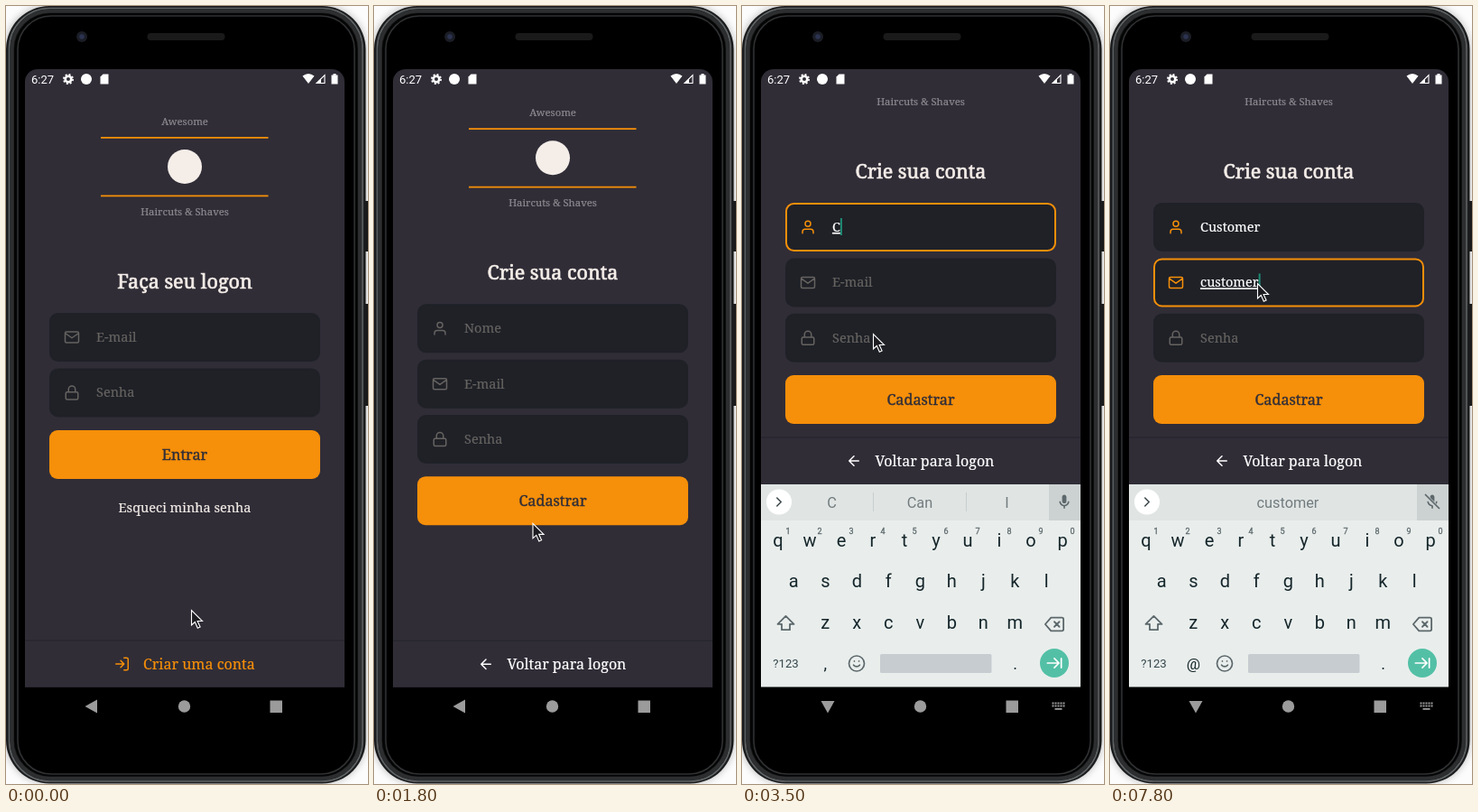
Write an HTML page that moves like this. It is 401 px wide and 862 px high and loops after 8 s.

```html
<!DOCTYPE html>
<html lang="pt-BR">
<head>
<meta charset="utf-8">
<title>Cadastro</title>
<style>
  html, body { margin: 0; width: 100%; height: 100%; overflow: hidden; background: #fcfcfc; }
  svg { display: block; width: 401px; height: 862px; }
  .serif { font-family: "Noto Serif", serif; }
  .sans { font-family: Roboto, sans-serif; }
</style>
</head>
<body>
<svg viewBox="0 0 401 862">
  <defs>
    <clipPath id="screen"><path d="M21 754.5V84a14 14 0 0 1 14-14H361a14 14 0 0 1 14 14V754.5z"/></clipPath>
    <clipPath id="page"><rect x="21" y="92" width="354" height="663"/></clipPath>
    <clipPath id="keys"><path d="M21 530H375V784a14 14 0 0 1-14 14H35a14 14 0 0 1-14-14z"/></clipPath>
    <filter id="soft"><feGaussianBlur stdDeviation="5"/></filter>
  </defs>
  <g id="phone">
    <rect x="0" y="0" width="398" height="861" rx="48" fill="#000" opacity=".3" filter="url(#soft)"/>
    <path d="M396 216h5v56h-5zM396 330h5v113h-5z" fill="#19191a"/>
    <rect x="0" y="0" width="398.5" height="861.5" rx="48" fill="#1b1c1d"/>
    <g fill="none">
      <rect x="3.5" y="2.5" width="391.5" height="856.5" rx="45" stroke="#5f6365" stroke-width="1.6"/>
      <rect x="6.5" y="5.5" width="385.5" height="850.5" rx="42" stroke="#2c2e2f" stroke-width="4"/>
    </g>
    <rect x="9" y="8" width="380.5" height="845.5" rx="40" fill="#050505"/>
    <rect x="13" y="11" width="373" height="840" rx="37" fill="#000" stroke="#2f3133" stroke-width="1.6"/>
    <circle cx="84" cy="34" r="6" fill="#1b1d25"/>
    <circle cx="84" cy="34" r="2.8" fill="#2b3350"/>
    <rect x="156.5" y="30" width="86" height="8" rx="4" fill="#1a1a1a"/>
  </g>
  <g id="app"></g>
</svg>
<script>
const BG = '#302d37', FIELD = '#1f2127', ORANGE = '#f68f09', CREAM = '#f4ede8', GREY = '#666360';
const INK = '#15262b', SOFT = '#5d686c', LOOP = 8000, STEP = 100, SCREEN_H = 685;
const app = document.getElementById('app');
const ruler = document.createElement('canvas').getContext('2d');

const ICON = {
  mail: 'M4 4h16c1.1 0 2 .9 2 2v12c0 1.1-.9 2-2 2H4c-1.1 0-2-.9-2-2V6c0-1.1.9-2 2-2zM22 6l-10 7L2 6',
  lock: 'M5 11h14a2 2 0 0 1 2 2v7a2 2 0 0 1-2 2H5a2 2 0 0 1-2-2v-7a2 2 0 0 1 2-2zM7 11V7a5 5 0 0 1 10 0v4',
  user: 'M20 21v-2a4 4 0 0 0-4-4H8a4 4 0 0 0-4 4v2M8 7a4 4 0 1 0 8 0 4 4 0 1 0-8 0',
  enter: 'M15 3h4a2 2 0 0 1 2 2v14a2 2 0 0 1-2 2h-4M10 17l5-5-5-5M15 12H3',
  back: 'M19 12H5M12 19l-7-7 7-7',
  right: 'M9 18l6-6-6-6',
  left: 'M15 18l-6-6 6-6',
  shift: 'M12 3L2 13h5v7h10v-7h5z',
  erase: 'M21 4H8l-7 8 7 8h13a2 2 0 0 0 2-2V6a2 2 0 0 0-2-2zM18 9l-6 6M12 9l6 6',
  smile: 'M2 12a10 10 0 1 0 20 0 10 10 0 1 0-20 0M8 14s1.5 2 4 2 4-2 4-2M9 9h.01M15 9h.01',
  tab: 'M3 12h14M12 6l6 6-6 6M21 6v12',
  mic: 'M12 14c1.66 0 3-1.34 3-3V5c0-1.66-1.34-3-3-3S9 3.34 9 5v6c0 1.66 1.34 3 3 3zM17 11c0 2.76-2.24 5-5 5s-5-2.24-5-5H5c0 3.53 2.61 6.43 6 6.92V21h2v-3.08c3.39-.49 6-3.39 6-6.92z',
  palette: 'M12 3a9 9 0 0 0 0 18c.83 0 1.5-.67 1.5-1.5 0-.39-.15-.74-.39-1.01-.23-.26-.38-.61-.38-.99 0-.83.67-1.5 1.5-1.5H16c2.76 0 5-2.24 5-5 0-4.42-4.03-8-9-8z',
  select: 'M9 4h6M12 4v16M9 20h6M5 9l-3 3 3 3M19 9l3 3-3 3',
  clip: 'M20 13V4H4v16h9M13 13h7l-1 7zM14 14l5 6'
};

// Timelines: lists of [time, value]
const nameText = [[0, ''], [3500, 'C'], [3700, 'Cu'], [4000, 'Cus'], [4100, 'Cust'], [4200, 'Custo'],
  [4400, 'Custom'], [4600, 'Custome'], [4700, 'Customer']];
const mailText = [[0, ''], [6400, 'c'], [6800, 'cu'], [6900, 'cus'], [7200, 'cust'], [7300, 'custo'],
  [7700, 'custome'], [7800, 'customer']];
const more = ',Customer,Customers';
const hints = [[0, ''], [3500, 'C,Can,I'], [3800, 'Cu,Cup,Cut'], [4000, 'Cus' + more], [4100, 'Cust' + more],
  [4200, 'Custo' + more], [4400, 'Custom' + more], [4700, 'Custome' + more],
  [5000, "Customer,Customers,Customer's"], [5700, ''], [6500, ',c'], [6900, ',cus'], [7300, ',custo'], [7800, ',customer']];
const caret = [[0, 0], [2400, 1], [2800, 0], [3300, 1], [5200, 0], [5600, 1], [6300, 0], [6400, 1]];
const pointer = [[300, 205.5, 669.5], [400, 202, 678], [500, 194, 697], [600, 184, 720], [700, 181.5, 732],
  [800, 198.5, 729.5], [1500, 198.5, 729.5], [1700, 188, 650], [2000, 152, 420], [2200, 145.5, 363.5],
  [5100, 145.5, 363.5], [5200, 172, 338], [5300, 183.5, 318], [5500, 183.5, 318], [5600, 163.5, 307.5]];

const at = (list, t) => list.filter(k => k[0] <= t).pop()[1];
const clamp = v => Math.max(0, Math.min(1, v));

function pointerAt(t) {
  const i = pointer.findIndex(k => k[0] > t);
  if (i < 1) return (i ? pointer[pointer.length - 1] : pointer[0]).slice(1);
  const [a, b] = [pointer[i - 1], pointer[i]], u = (t - a[0]) / (b[0] - a[0]);
  return [1, 2].map(n => a[n] + (b[n] - a[n]) * u);
}

// cubic-bezier(.208, .82, .25, 1)
function reveal(x) {
  const curve = (s, p, q) => 3 * (1 - s) * (1 - s) * s * p + 3 * (1 - s) * s * s * q + s * s * s;
  let lo = 0, hi = 1;
  for (let i = 0; i < 20; i++) {
    const mid = (lo + hi) / 2;
    if (curve(mid, .20833, .25) < x) lo = mid; else hi = mid;
  }
  return curve(lo, .82, 1);
}

const text = (s, x, y, size, fill, extra = '') =>
  `<text x="${x}" y="${y}" font-size="${size}" fill="${fill}" ${extra}>${s}</text>`;
const weigh = (color, width) => `stroke="${color}" stroke-width="${width}"`;
const mid = (s, x, y, size, fill, weight = 0) =>
  text(s, x, y, size, fill, 'text-anchor="middle" ' + weigh(fill, weight));
const rect = (x, y, w, h, fill, extra = '') =>
  `<rect x="${x}" y="${y}" width="${w}" height="${h}" fill="${fill}" ${extra}/>`;
const dot = (x, y, r, fill) => `<circle cx="${x}" cy="${y}" r="${r}" fill="${fill}"/>`;
const group = (body, attrs) => `<g ${attrs}>${body}</g>`;
const shift = (body, dy) => group(body, `transform="translate(0 ${dy})"`);
const icon = (name, x, y, scale, color, fill = 'none', width = 2) =>
  `<path d="${ICON[name]}" transform="translate(${x} ${y}) scale(${scale}) translate(-12 -12)" fill="${fill}"
    stroke="${color}" stroke-width="${width}" stroke-linecap="round" stroke-linejoin="round"/>`;

function field(y, name, label, value = '', focus = false, caretOn = 0) {
  const color = focus || value ? ORANGE : GREY, ink = value ? '#fff' : GREY;
  let s = rect(49, y + 1, 298, 52, FIELD, `rx="8.5" stroke="${focus ? ORANGE : FIELD}" stroke-width="2"`) +
    icon(name, 73, y + 27, .75, color) +
    text(value || label, 100, y + 32, 14.5, ink,
      weigh(ink, .2) + (value && focus ? ' text-decoration="underline"' : ''));
  if (focus && caretOn) {
    ruler.font = '14.5px "Noto Serif", serif';
    s += rect(100 + ruler.measureText(value).width, y + 17, 2, 19, '#1f8a73');
  }
  return s;
}

const button = (y, label) => rect(48, y, 300, 54, ORANGE, 'rx="9"') + mid(label, 198, y + 33, 16.2, '#312e38', .4);

const header = title =>
  mid('Awesome', 198, 132, 11.3, '#8e8a90', .2) + rect(105, 145, 185.5, 1.8, ORANGE) +
  dot(198, 178, 19, CREAM) +
  rect(105, 209.5, 185.5, 1.8, ORANGE) + mid('Haircuts &amp; Shaves', 198, 232, 11.3, '#8e8a90', .2) +
  mid(title, 198, 313, 21.5, CREAM, .7);

const footer = (name, label, x, color, alpha = 1) =>
  rect(21, 703, 354, 52, BG) + rect(21, 702.5, 354, 1, '#25232b') +
  group(icon(name, x, 729, .75, color) + text(label, x + 23.5, 735, 16, color, weigh(color, .2)), `opacity="${alpha}"`);

const login = t => rect(21, 70, 354, 720, BG) + header('Faça seu logon') +
  field(340, 'mail', 'E-mail') + field(401.4, 'lock', 'Senha') + button(470, 'Entrar') +
  mid('Esqueci minha senha', 198, 561, 14.5, CREAM, .2) +
  footer('enter', 'Criar uma conta', 128.5, ORANGE, t === 1100 ? .4 : 1);

function signup(t) {
  const scroll = 112 * clamp((t - 2400) / 200), onName = t >= 2400 && t < 5600, onMail = t >= 5600;
  const form = shift(header('Crie sua conta'), -10) +
    field(330, 'user', 'Nome', at(nameText, t), onName, at(caret, t)) +
    field(391.4, 'mail', 'E-mail', at(mailText, t), onMail, at(caret, t)) +
    field(452.8, 'lock', 'Senha') + button(521, 'Cadastrar');
  return rect(21, 70, 354, 685, BG) + shift(form, -scroll) +
    shift(footer('back', 'Voltar para logon', 124, '#fff'), t >= 2500 ? -225 : 0);
}

function pages(t) {
  const p = reveal(clamp((t - 1476) / 425));
  if (t < 1476) return login(t);
  if (t > 1901) return signup(t);
  const drop = SCREEN_H * (1 - p);
  return shift(login(t), -.02 * SCREEN_H * p) +
    rect(21, 70, 354, SCREEN_H, '#000', `opacity="${Math.min(1, p / .36) * .1}"`) +
    `<clipPath id="card">${rect(21, 70 + drop, 354, SCREEN_H, '#000')}</clipPath>` +
    group(shift(signup(t), drop * .041), 'clip-path="url(#card)"');
}

function toolbar(t) {
  const tools = t >= 5700 && t < 6500, words = at(hints, t).split(',');
  let s = rect(21, 530, 354, 40, '#e0e5e4') + rect(340, 530, 35, 40, '#ccd2d1') +
    dot(41, 549.5, 14, '#fff') + icon(tools ? 'left' : 'right', 41, 549.5, .75, '#3d484c') +
    icon('mic', 357, 549.5, .8, 'none', SOFT);
  if (t >= 5700) s += `<path d="M349 542l16 16" stroke="#ccd2d1" stroke-width="4"/>
    <path d="M349 541l16 16" stroke="${SOFT}" stroke-width="1.7"/>`;
  if (tools) {
    s += rect(82, 543, 14, 14, SOFT) + icon('palette', 140, 550, .85, 'none', SOFT) +
      [[135.5, 549], [138, 545.5], [142.5, 545.5], [145, 549]].map(([x, y]) => dot(x, y, 1.2, '#e0e5e4')).join('') +
      icon('select', 191.5, 550, .75, SOFT) + icon('clip', 243, 550, .85, SOFT) +
      rect(274.5, 540, 1, 20, '#c8cdcd') + [301, 307, 313].map(x => dot(x, 550, 1.9, SOFT)).join('');
  } else {
    if (words[0]) s += rect(145, 539, 1, 21, '#c8cdcd') + rect(248, 539, 1, 21, '#c8cdcd');
    words.forEach((w, i) => s += mid(w, [99.5, 197, 293.5][i], 555.5, w.length > 9 ? 15.5 : 16.3, '#727b7e'));
  }
  return s;
}

function keyboard(t) {
  const caps = t < 3500;
  let s = rect(21, 530, 354, 270, '#e9eeec') + toolbar(t);
  [['qwertyuiop', 40, 599], ['asdfghjkl', 57.3, 644], ['zxcvbnm', 92.3, 690]].forEach(([row, x, y]) =>
    [...row].forEach((c, i) => s += mid(caps ? c.toUpperCase() : c, x + 35 * i, caps ? y + 1 : y, 20, INK)));
  for (let i = 0; i < 10; i++) s += mid((i + 1) % 10, 51 + 35 * i, 585, 9, SOFT, .3);
  s += icon('shift', 48.5, 684, .9, SOFT, caps ? SOFT : 'none') + icon('erase', 346, 685, .92, SOFT) +
    mid('?123', 48.5, 733, 13.2, '#34454a') + mid(t < 5700 ? ',' : '@', 92.3, 734.5, t < 5700 ? 18 : 17, INK) +
    icon('smile', 127, 728.5, .85, SOFT) + rect(153, 718, 123.5, 21, '#c7ccd0', 'rx="1.5"') +
    mid('.', 302.5, 734.5, 18, INK) + dot(346, 728, 16, '#53c0a6') + icon('tab', 346, 728, .85, '#fff');
  return s;
}

function keyboardPanel(t) {
  if (t < 2400) return '';
  const u = clamp((t - 2400) / 200), drop = 71 * (1 - u) ** 2;
  const panel = `<g opacity="${.5 + .5 * u}">${shift(keyboard(t), drop)}</g>`;
  // Once settled the panel ends at the navigation bar
  return group(rect(21, 530, 354, 224.5, '#f8f9f8') + panel, 'clip-path="url(#keys)"') +
    (u === 1 ? rect(21, 754.5, 354, 45, '#000') : '');
}

const statusBar = text('6:27', 28, 85.5, 13, '#fff') +
  `<g fill="none" stroke="#fff"><circle cx="69" cy="81" r="3.3" stroke-width="2.6"/>
    <circle cx="69" cy="81" r="5" stroke-width="2" stroke-dasharray="1.96 1.96"/>
    <path d="M344 85.5h9v-9z" stroke-width="1.1"/></g>` +
  dot(89, 81, 6, '#fff') +
  `<g fill="#fff"><path d="M107.5 75.5h6v11h-9v-8z"/><path d="M328.5 77.5q6.5-5 13 0l-6.5 8.5z"/>
    <path d="M344 85.5l5-5v5z"/><path d="M362.5 75h3v1.5h2v10h-7v-10h2z"/></g>`;

function navBar(t) {
  const open = t >= 2400, turn = open ? -15 - 75 * clamp((t - 2400) / 200) : 0;
  const color = t >= 2400 && t < 2600 ? '#c9c9c9' : '#9b9b9b';
  let s = `<path d="M87.5 776l13.5-7.5v15z" transform="rotate(${turn} 95 776)"/>` +
    dot(197.5, 776, 6.7, color) + rect(292.5, 769.5, 13.5, 13.5, color);
  if (open) s += `<path d="M343.5 772.5h14M343.5 775.5h14" stroke="${color}" stroke-width="1.8" stroke-dasharray="2 1"/>` +
    rect(346.5, 778, 8, 1.8, color);
  return group(s, `fill="${color}"`);
}

function draw(t) {
  const [x, y] = pointerAt(t);
  app.innerHTML =
    group(rect(21, 70, 354, 685, BG) + group(pages(t), 'class="serif" clip-path="url(#page)"') +
      group(statusBar, 'class="sans"'), 'clip-path="url(#screen)"') +
    group(keyboardPanel(t), 'class="sans"') + navBar(t) +
    `<path d="M0 0V16.5l3.8-3.5 3 6.7 2.8-1.2-3-6.5h5.4z" transform="translate(${x} ${y})"
      fill="#1c1b20" stroke="#fff" stroke-width="1.1"/>`;
}

const start = performance.now();
let shown = -1;
function frame() {
  const t = Math.floor((performance.now() - start) % LOOP / STEP) * STEP;
  if (t !== shown) draw(shown = t);
  requestAnimationFrame(frame);
}
frame();
</script>
</body>
</html>
```
